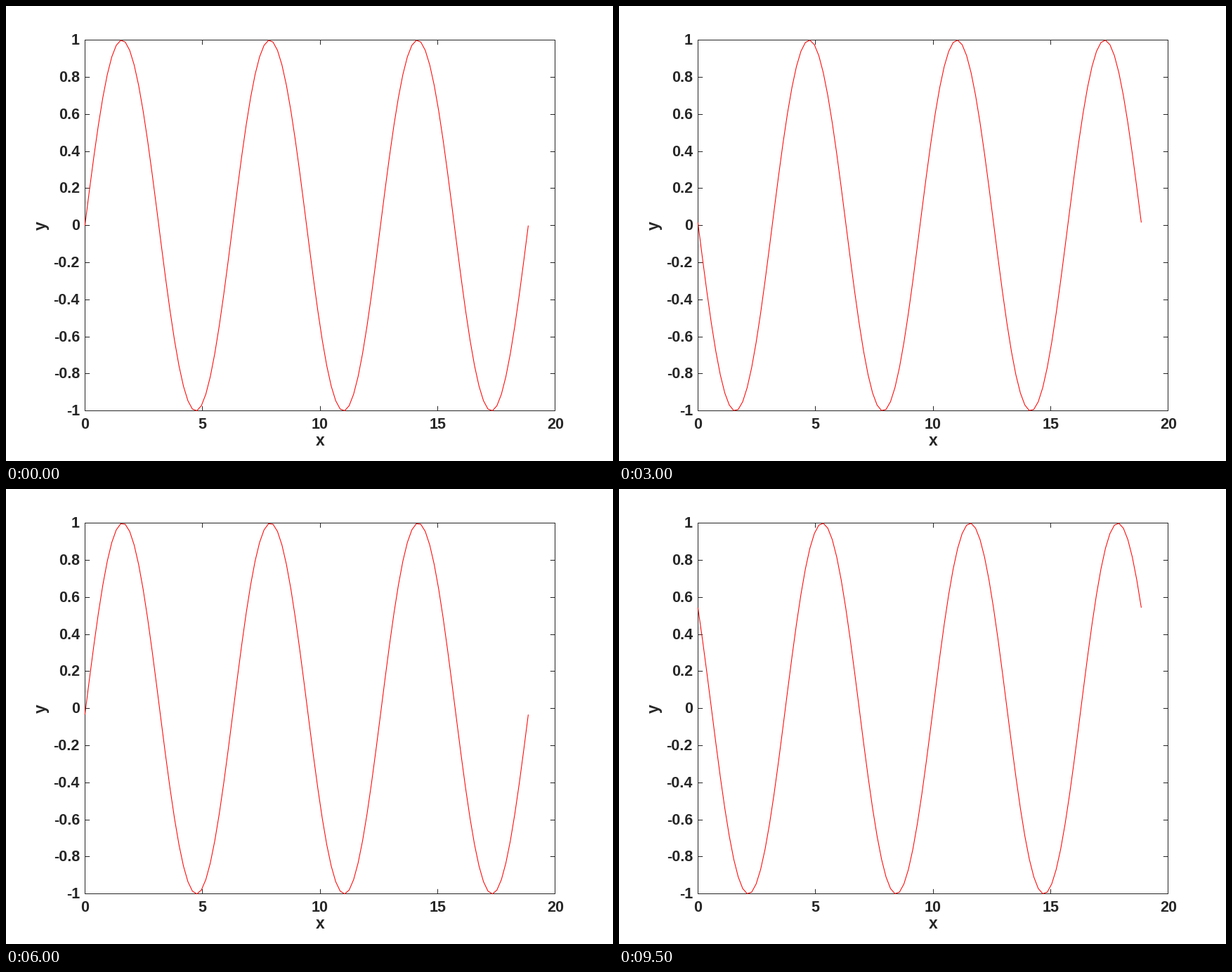
A matplotlib script that plays this animation: 864 px wide and 648 px high, repeating every 10000 ms.

```python
import matplotlib.pyplot as plt
import numpy as np
from matplotlib.animation import FuncAnimation

WIDTH, HEIGHT = 864, 648
LEFT, RIGHT, TOP, BOTTOM = 112.32, 781.92, 48.6, 576.72
FRAMES, INTERVAL = 20, 500
INK = "#262626"
TICK = 6.7

plt.rcParams["font.family"] = "Liberation Sans"
plt.rcParams["font.weight"] = "bold"

# At 72 dpi one point equals one pixel.
fig = plt.figure(figsize=(WIDTH / 72, HEIGHT / 72), dpi=72, facecolor="white")
ax = fig.add_axes([0, 0, 1, 1])
ax.set(xlim=(0, WIDTH), ylim=(HEIGHT, 0))
ax.axis("off")


def px(x):
    return LEFT + x / 20 * (RIGHT - LEFT)


def py(y):
    return TOP + (1 - y) / 2 * (BOTTOM - TOP)


def crisp(v):
    return np.floor(v) + 0.5


def stroke(xs, ys):
    ax.plot(xs, ys, color=INK, lw=1, snap=False, solid_capstyle="butt",
            solid_joinstyle="miter")


def label(x, y, text, size=21.5, **kwargs):
    ax.text(x, y, text, color=INK, size=size, va="baseline", **kwargs)


x0, x1, y0, y1 = map(crisp, (LEFT, RIGHT, TOP, BOTTOM))
stroke([x0, x1, x1, x0, x0, x1], [y0, y0, y1, y1, y0, y0])

for value in range(0, 21, 5):
    x = crisp(px(value))
    stroke([x, x], [y1, y1 - TICK])
    stroke([x, x], [y0, y0 + TICK])
    label(px(value), 602, str(value), ha="center")

for value in np.arange(-5, 6) / 5:
    y = crisp(py(value))
    stroke([x0, x0 + TICK], [y, y])
    stroke([x1, x1 - TICK], [y, y])
    label(105, y + 6.5, f"{value:g}", ha="right")

label(447.5, 626, "x", size=22.9, ha="center")
ax.text(57, 312.5, "y", color=INK, size=22.9, rotation=90,
        rotation_mode="anchor", ha="center", va="baseline")

xs = np.linspace(0, 6 * np.pi, 100)
shifts = np.linspace(0, 10, FRAMES)
wave, = ax.plot(px(xs), py(np.sin(xs)), color="red", lw=1.04, zorder=5,
                solid_capstyle="butt")


def update(frame):
    wave.set_ydata(py(np.sin(xs - shifts[frame])))
    return wave,


anim = FuncAnimation(fig, update, frames=FRAMES, interval=INTERVAL,
                     repeat=True, repeat_delay=0)
plt.show()
```
